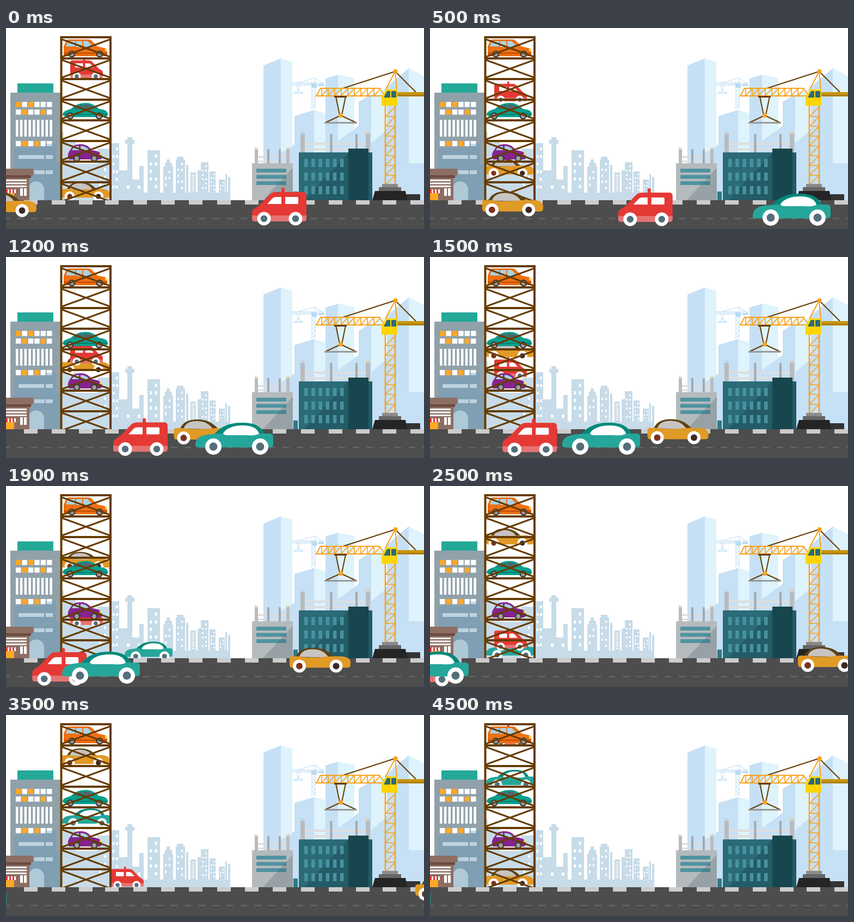
Recreate the animation shown at these times as an HTML page with a canvas. Size 768x370 px, loop 4.6 s.

```html
<!DOCTYPE html>
<html lang="en">
<head>
<meta charset="utf-8">
<title>Car lift in the city</title>
<style>
  html, body { margin: 0; width: 100%; height: 100%; overflow: hidden; background: #fff; }
  canvas { display: block; }
</style>
</head>
<body>
<canvas id="stage" width="768" height="370"></canvas>
<script>
const ctx = document.getElementById('stage').getContext('2d');

// ---------- drawing helpers ----------
function box(color, x, y, w, h) {
  ctx.fillStyle = color;
  ctx.fillRect(x, y, w, h);
}
function fill(color, d) {
  ctx.fillStyle = color;
  ctx.fill(new Path2D(d));
}
function stroke(color, width, d) {
  ctx.strokeStyle = color;
  ctx.lineWidth = width;
  ctx.stroke(new Path2D(d));
}
function disc(color, x, y, r) {
  ctx.fillStyle = color;
  ctx.beginPath();
  ctx.arc(x, y, r, 0, 7);
  ctx.fill();
}
function wheel(x, y, r, hub, rim = '#fff', hubSize = .5) {
  disc(rim, x, y, r);
  disc(hub, x, y, r * hubSize);
}

// ---------- right side: towers, cranes, building sites ----------
function towers() {
  const shade = '#c6e0f5', light = '#def3fb';
  fill(shade, 'M473 69L505 56V222L530 215V162L566 151V205L587 195V93L610 86V208L648 180V136L671 122V212L700 185V108L740 74V249H768V317H473Z');
  fill(light, 'M505 56L526 62V218L505 230Z');
  fill(light, 'M566 151L587 157V229H566Z');
  fill(light, 'M610 86L640 92V185L610 208Z');
  fill(light, 'M671 122L697 112V190L671 212Z');
  fill(light, 'M740 74L768 89V249H740Z');
}
function farCrane() {
  const c = '#b9dbf3';
  stroke(c, 1, 'M562 104V150M568 92V150M525 101H585M527 105H585M525 101L527 105M568 92L535 101M568 92L583 103M534 105L537 117L540 105M528 120L537 115L546 120');
  let d = '';
  for (let x = 529; x < 560; x += 5) d += `M${x} 105L${x + 2.5} 101L${x + 5} 105`;
  for (let y = 108; y < 148; y += 8) d += `M562 ${y}L568 ${y + 4}L562 ${y + 8}`;
  stroke(c, .8, d);
  box(c, 561, 102, 10, 8);
  box(c, 574, 103, 10, 4);
  box(c, 529, 119, 17, 1.5);
}
function graySite() {
  for (const x of [457, 515]) {
    box('#b9bbbc', x, 223, 6, 27);
    box('#e9bd86', x + .5, 219, 1.2, 4);
    box('#e9bd86', x + 3.5, 219, 1.2, 4);
  }
  box('#dcdedf', 463, 236, 52, 3);
  box('#dcdedf', 463, 244, 52, 3);
  box('#a5a8aa', 480, 223, 4, 26);
  box('#a5a8aa', 501, 223, 4, 26);
  box('#b5babc', 452, 249, 75, 68);
  for (const y of [259, 270.5, 282]) box('#4f93a1', 460, y, 55, 7);
  fill('rgba(60,85,95,.24)', 'M527 257V317H472Z');
}
function tealSite() {
  box('#2f7a86', 528, 301, 8, 16);
  for (const x of [541, 661]) {
    box('#b9bbbc', x, 195, 8, 34);
    box('#e9bd86', x + 1, 190, 1.2, 5);
    box('#e9bd86', x + 5, 190, 1.2, 5);
  }
  box('#dcdedf', 549, 211, 112, 4);
  box('#dcdedf', 549, 221, 112, 4);
  box('#a5a8aa', 595.5, 195, 4, 34);
  box('#a5a8aa', 642, 195, 4, 34);
  box('#2b6b78', 538, 229, 135, 88);
  fill('#235b66', 'M629 229V317H548Z');
  for (const y of [241, 266, 291])
    for (let i = 0; i < 6; i++) box('#4892a0', 548 + i * 13.2, y, 6.5, 15);
  box('#17464e', 629, 222, 37, 95);
  box('#235b66', 666, 229, 7, 88);
}
function crane() {
  const orange = '#f9a11b', brown = '#663c00';
  stroke(brown, 2, 'M715 80L619 111M715 80L753 118');
  stroke(orange, 2, 'M715 80L697 114M715 80L718 114');
  stroke(orange, 2, 'M578 111H686L696 125H570Z');
  let truss = '';
  for (let x = 580; x < 685; x += 12) truss += `M${x} 111V125L${x + 12} 111`;
  for (let y = 145; y < 287; y += 18) truss += `M697 ${y + 18}H715M697 ${y + 18}L715 ${y}`;
  stroke(orange, 1.7, truss);
  box('#c9960c', 719, 118, 49, 8);
  box('#a97a08', 719, 123, 49, 2.5);
  stroke(orange, 2.5, 'M697 142V288M715 142V288');
  fill('#ffd400', 'M698 113H719V143H690V127Z');
  fill('#2b6b78', 'M700 116H706V128H694ZM708 116H717V128H708Z');
  disc(orange, 715.5, 80, 4);

  stroke(brown, 2, 'M606 126L613 160M624 126L617 160M615 161L587 174M615 161L643 174');
  stroke(brown, 3, 'M603 126.5H626');
  disc(orange, 615, 161, 4);
  box('#999', 585, 173, 60, 3);

  box('#8a8a8a', 691, 287, 29, 6);
  box('#666', 685, 293, 41, 7);
  box('#333', 730, 306, 31, 11);
  fill('#252525', 'M678 300H734L737 317H673Z');
}

// ---------- left side: offices, skyline, shop ----------
function offices() {
  box('#24a898', 21, 102, 66, 17);
  box('#90a1aa', 8, 119, 93, 198);
  [[136, 'owowww'], [150, 'wowwow'], [208, 'wowoww']].forEach(([y, row]) =>
    [...row].forEach((c, i) => box(c === 'o' ? '#ffa726' : '#fff', 18 + i * 11.4, y, 9.5, 9.5)));
  for (let i = 0; i < 9; i++) box('#fff', 18 + i * 7.8, 169, 4.5, 31);
}
function skyline() {
  const city = new Path2D();
  const block = (x0, x1, top, bottom = 303) => city.rect(x0, top, x1 - x0, bottom - top);
  // A reversed rectangle cuts a hole under the nonzero rule.
  const hole = (x, y, w, h) => city.rect(x + w, y, -w, h);
  const windows = (x, y, cols, rows, dx, dy, w, h) => {
    for (let r = 0; r < rows; r++)
      for (let c = 0; c < cols; c++)
        if ((r * 3 + c * 2) % 4) hole(x + c * dx, y + r * dy, w, h);
  };
  block(8, 412, 303, 317);
  block(16, 72, 221); block(72, 92, 213);
  block(8, 16, 262); block(92, 101, 250);
  block(101, 106, 192); block(106, 128, 206);
  block(128, 168, 250); block(168, 190, 222);
  block(193, 208, 212); block(208, 223, 262); block(223, 232, 213);
  block(219, 236, 206, 213); block(223, 232, 201, 206);
  block(232, 245, 279); block(245, 253, 254);
  block(260, 283, 225);
  block(289, 307, 255); block(292, 305, 248, 255); block(295, 301, 242, 248);
  block(312, 329, 242); block(314, 326, 237, 242); block(331, 335, 252);
  block(339, 349, 266); block(352, 358, 262); block(358, 372, 247);
  block(374, 385, 264); block(391, 402, 279); block(403, 406, 269); block(408, 412, 274);
  windows(171, 258, 2, 3, 9, 14, 4, 5);
  windows(196, 220, 2, 6, 6, 14, 3.5, 5);
  windows(212, 290, 4, 1, 10, 9, 5, 6);
  windows(264, 233, 2, 5, 10, 14, 4, 6);
  windows(292, 262, 2, 3, 7, 12, 3, 5);
  windows(315, 248, 2, 5, 7, 11, 3, 4);
  for (let y = 270; y < 302; y += 4) hole(341, y, 6, 1.5);
  windows(360, 253, 2, 6, 6, 8, 3, 3);
  windows(376, 268, 2, 5, 5, 7, 2.5, 3);
  windows(393, 283, 2, 3, 5, 6, 2, 3);
  ctx.fillStyle = 'rgba(100,155,190,.36)';
  ctx.fill(city);
  for (const [x, y, w] of [[23, 234, 47], [73, 234, 13], [52, 262, 19], [73, 262, 13]])
    box('#bcd2de', x, y, w, 7);
}
function shop() {
  fill('#b0c9d6', 'M41 317V297A14.5 14.5 0 0 1 70 297V317Z');
  box('#8d6e63', 0, 276, 43, 41);
  box('#8d6e63', 0, 259, 50, 12);
  box('#6d4c41', 0, 271, 46, 5);
  for (const y of [279, 284.5, 290]) box('#fff', 0, y, 38, 3);
  box('#fff', 26, 295, 5, 14);
  box('#fff', 33, 295, 5, 14);
  for (let i = 0; i < 6; i++) box(i % 2 ? '#fff' : '#e53935', i * 3, 297, 3, 7);
  box('#ffa726', 0, 304, 15, 13);
}
function road() {
  box('#4d4d4d', 0, 317, 768, 53);
  for (const x of [33, 84, 134, 182, 234, 285, 336, 388, 439, 490, 542, 593, 643, 692, 743])
    box('#ccc', x, 317, 25, 8);
  for (let x = -5.7; x < 768; x += 25.7) box('#666', x, 349.5, 12, 2.5);
}

// ---------- cars: x is the left end, y the wheel axis ----------
// A negative scale mirrors the car, with x as its right end.
function place(draw, x, y, scale = 1) {
  ctx.save();
  ctx.translate(x, y);
  ctx.scale(scale, Math.abs(scale));
  draw();
  ctx.restore();
}
function redVan() {
  fill('#e53935', 'M54 -46V-54Q54 -57 57 -57Q60 -57 60 -54V-46ZM0 -10Q0 -16 5 -19L14 -25L31 -43Q36 -49 43 -49H94Q100 -49 100 -42V0H0Z');
  fill('#e57373', 'M0 -6H100V0Q100 5 95 5H5Q0 5 0 0Z');
  fill('#fff', 'M28 -27L37 -37Q40 -40 44 -40H54V-27ZM61 -40H83Q85 -40 85 -38V-29Q85 -27 83 -27H61Z');
  wheel(22, 0, 12.5, '#546e7a');
  wheel(80, 0, 12.5, '#546e7a');
}
function tealCar() {
  fill('#00897b', 'M34 -22C46 -37 62 -44 86 -44C108 -44 121 -38 128 -22Z');
  fill('#26a69a', 'M0 -3C0 -13 5 -18 16 -21C30 -24 45 -24 60 -24H137Q143 -24 143 -17V-5Q143 1.5 136 1.5H5Q0 1.5 0 -3Z');
  fill('#fff', 'M51 -25C58 -35 72 -39 87 -39C103 -39 114 -34 117 -24C114 -21 104 -20 93 -21L60 -21Q51 -21 51 -25Z');
  wheel(33, 0, 15, '#546e7a');
  wheel(119, 0, 15, '#546e7a');
}
function yellowCar() {
  fill('#5d4215', 'M11 -16C16 -29 27 -34 43 -34C60 -34 72 -28 82 -16Z');
  fill('#c8c4c2', 'M18 -17C21 -27 30 -31 42 -31C56 -31 65 -26 72 -16Z');
  fill('#e09a26', 'M0 -14Q0 -18 5 -18H18Q26 -16 38 -16H55Q68 -18 80 -18H96Q112 -16 112 -7V-2Q112 3 106 3H5Q0 3 0 -3Z');
  wheel(18, 0, 12, '#7a331e');
  wheel(85.5, 0, 12, '#3e2723');
}
function smallWheels(y, ...xs) {
  for (const x of xs) wheel(x, y, 6.5, '#9e9e9e', '#3b3b3b', .6);
}
function parkedCars() {
  fill('#ef7012', 'M106 47V34L111 23Q112 21 116 21H151Q156 21 160 26L168 34L182 37Q186 39 186 45V50Q186 52 183 52H108Q106 52 106 47Z');
  fill('#a9d3e3', 'M110 34L114 24H127V34ZM129 24H140V35H129ZM142 24H150L161 35H142Z');
  fill('#c9540a', 'M106 45H186V48H106Z');
  box('#ffd54f', 182, 38, 3.5, 5);
  smallWheels(48, 121, 172);

  fill('#07a08d', 'M104 160C104 153 111 152 119 149C128 140 137 138 148 138C159 138 165 144 171 149C181 150 186 152 187 158V161L182 164H110Z');
  fill('#52666a', 'M123 149Q130 141 140 141V149ZM142 141Q156 139 164 149H142Z');
  fill('#067e70', 'M107 158H186V160H107Z');
  smallWheels(162, 118, 171);

  fill('#86238f', 'M114 239C113 231 116 227 119 223C123 215 130 214 138 214C148 214 153 219 158 225C169 226 175 229 176 235V240L172 242H116Z');
  fill('#a9d3e3', 'M121 225Q125 217 134 217V225ZM137 217Q147 217 153 225H137Z');
  box('#ffd54f', 172, 230, 4, 4);
  smallWheels(240, 130, 162);
}
function liftFrame() {
  const brown = '#663c00';
  for (let i = 0; i < 8; i++) {
    const y = 18 + i * 38;
    stroke(brown, 3, `M103 ${y + 3}L191 ${y + 35}M191 ${y + 3}L103 ${y + 35}`);
    stroke(brown, 4, `M100 ${i ? y : 17}H194`);
  }
  stroke(brown, 4, 'M101.5 15V317M192 15V317');
}

// ---------- motion ----------
// Linear interpolation through [step, value] pairs, held at both ends.
function track(n, keys) {
  if (n <= keys[0][0]) return keys[0][1];
  for (let i = 1; i < keys.length; i++) {
    const [a, from] = keys[i - 1], [b, to] = keys[i];
    if (n <= b) return from + (to - from) * (n - a) / (b - a);
  }
  return keys[keys.length - 1][1];
}
// The picture advances in steps whose length varies along the loop.
function stepAt(t) {
  if (t < 2300) return Math.floor(t / 100);
  if (t < 3900) return 23 + Math.floor((t - 2300) / 200);
  return t < 4500 ? Math.min(34, 31 + Math.floor((t - 3900) / 100)) : 35;
}
function liftCars(n) {
  const restart = n === 35;
  place(yellowCar, 103, restart ? 310 : track(n, [[0, 310], [26, 88]]), .78);
  if (n >= 17)
    place(tealCar, track(n, [[19, 218], [24, 103]]) + 23 * Math.max(0, 19 - n),
      track(n, [[19, 313.5], [23, 313.5], [24, 311], [28, 213], [29, 199], [30, 172], [34, 128]]), .615);
  if (restart) place(redVan, 178, 51, -.6);
  else if (n <= 31)
    place(redVan, 178 + 25 * Math.max(0, n - 26), track(n, [[0, 89], [26, 313]]), -.6);
}
function roadCars(n) {
  const k = Math.min(n, 26);
  place(yellowCar, track(n, [[0, -56], [19, 521], [24, 676], [26, 737], [29, 752], [30, 763], [32, 775]]), 336 - k * .24);
  place(redVan, 452 - 21.25 * k, 351 + k * .21);
  place(tealCar, 768 - 35 * k, 349);
}
function render(n) {
  box('#fff', 0, 0, 768, 370);
  towers();
  farCrane();
  graySite();
  tealSite();
  crane();
  offices();
  skyline();
  shop();
  liftCars(n);
  parkedCars();
  liftFrame();
  road();
  roadCars(n);
}

let shown = -1;
function tick() {
  const n = stepAt(performance.now() % 4600);
  if (n !== shown) render(shown = n);
  requestAnimationFrame(tick);
}
tick();
</script>
</body>
</html>
```
